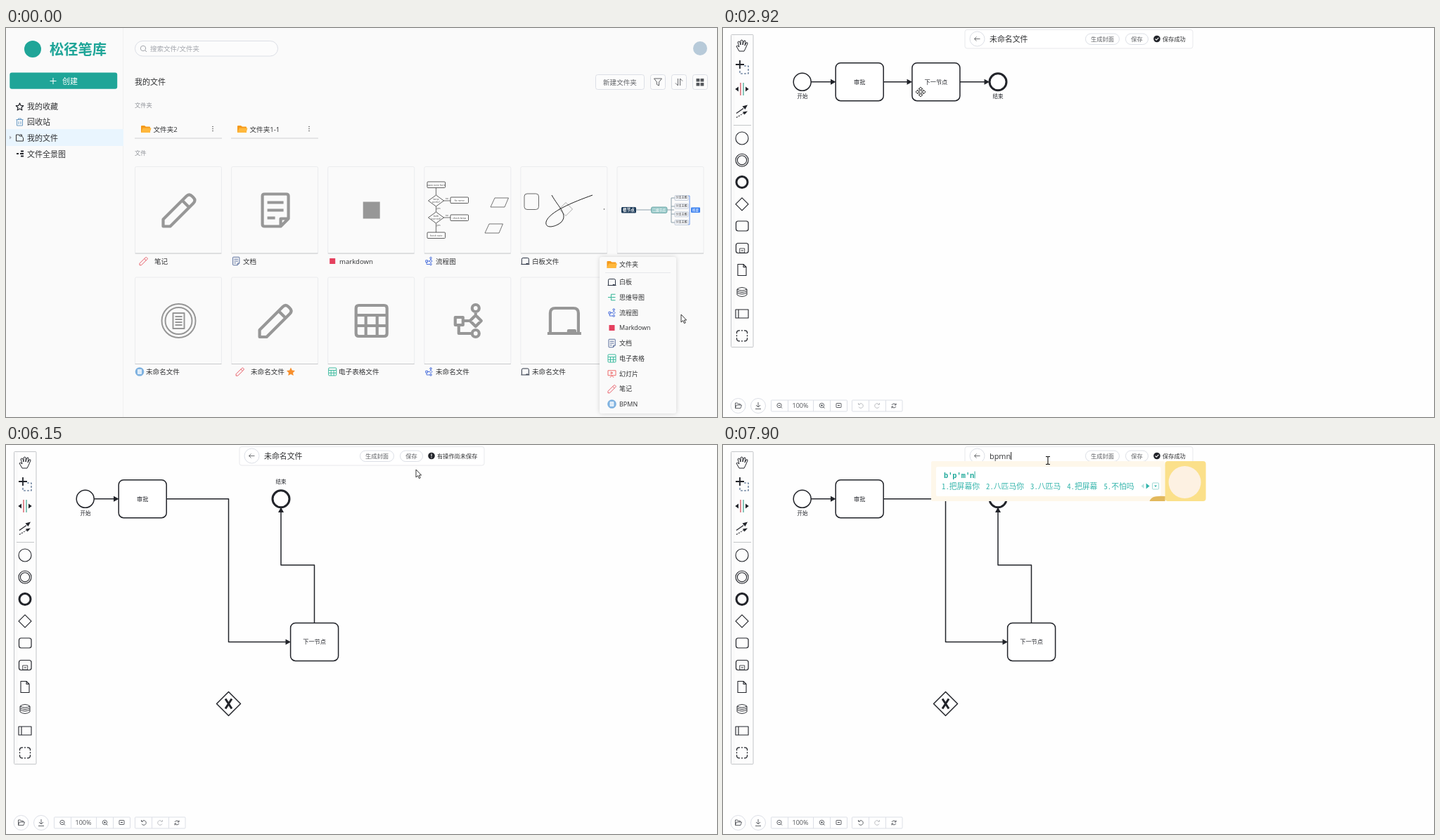
Write an HTML page with a canvas that moves like this. It is 1011 by 554 pixels and loops after 8000 ms.

```html
<!DOCTYPE html>
<html lang="zh">
<head>
<meta charset="utf-8">
<style>
html, body { margin: 0; width: 100%; height: 100%; overflow: hidden; background: #fff; }
canvas { display: block; }
</style>
</head>
<body>
<canvas id="stage" width="1011" height="554"></canvas>
<script>
const ctx = document.getElementById('stage').getContext('2d');
const LOOP = 8000, INK = '#22242a', TEAL = '#1fa598', BLUE = '#0a8ef5', GREY = '#979797', RULE = '#dcdfe6';
const SANS = '"Open Sans", "Noto Sans CJK SC", "Noto Sans CJK", sans-serif';
const MONO = '"Noto Sans Mono CJK SC", "Noto Sans CJK SC", monospace';

// ---------- drawing helpers ----------
function text(s, x, y, size, color = '#303133', { align = 'left', weight = 400, font = SANS } = {}) {
  ctx.font = `${weight} ${size}px ${font}`;
  ctx.textAlign = align;
  ctx.fillStyle = color;
  ctx.fillText(s, x, y + size * 0.37);
}
function paint(path, fill, stroke, width = 1) {
  if (fill) { ctx.fillStyle = fill; ctx.fill(path); }
  if (stroke) { ctx.strokeStyle = stroke; ctx.lineWidth = width; ctx.stroke(path); }
}
function box(x, y, w, h, r, fill, stroke, width) {
  const p = new Path2D();
  p.roundRect(x, y, w, h, r);
  paint(p, fill, stroke, width);
}
function disc(x, y, r, fill, stroke, width) {
  const p = new Path2D();
  p.arc(x, y, r, 0, 7);
  paint(p, fill, stroke, width);
}
function pen(d, x = 0, y = 0, color = INK, width = 1, { scale = 1, fill, dash = [] } = {}) {
  ctx.save();
  ctx.translate(x, y);
  ctx.scale(scale, scale);
  ctx.setLineDash(dash);
  ctx.lineJoin = 'round';
  paint(new Path2D(d), fill, color, width / scale);
  ctx.restore();
}
const diamond = r => `M0 ${-r}L${r} 0L0 ${r}L${-r} 0Z`;

// ---------- file icons on a 50 unit square ----------
const ICON = {
  pencil: 'M-22 23V13L11-20Q15-24 19-20L21-18Q25-14 21-10L-12 23ZM5-14L15-4',
  doc: 'M-15-23H16Q19-23 19-20V12L8 23H-15Q-18 23-18 20V-20Q-18-23-15-23ZM-11-11H12M-11 0H12M-11 11H0M19 12H8V23',
  table: 'M-18-22H18Q22-22 22-18V18Q22 22 18 22H-18Q-22 22-22 18V-18Q-22-22-18-22ZM-22-8H22M-22 7H22M-8-8V22M8-8V22',
  flow: 'M16-18a5 5 0 1 1-10 0a5 5 0 1 1 10 0M16 18a5 5 0 1 1-10 0a5 5 0 1 1 10 0M11-8L19 0L11 8L3 0ZM-18-5H-7V6H-18ZM-7 0H3M11-13V-8M-13 6V18H6',
  board: 'M-20 17V-11Q-20-18-13-18H13Q20-18 20-11V17M-24 18H24M6 18V14H15V18',
  list: 'M24 0a24 24 0 1 1-48 0a24 24 0 1 1 48 0M19 0a19 19 0 1 1-38 0a19 19 0 1 1 38 0M-8-11H8V11H-8ZM-5-6H5M-5-2H5M-5 2H5M-5 6H5',
  slides: 'M-22-18H22V10H-22ZM-10 22L0 10L10 22M-5-10L6-4L-5 2Z',
  mind: 'M-22 0H0M-4-17V17M-4-17H20M0 0H20M-4 17H20',
};
const TINT = { pencil: '#e8606a', doc: '#5a6f9c', table: '#3dbb9f', flow: '#4a6fdc', board: '#2c3444', slides: '#ee6b6b', mind: '#35b597' };
const bigIcon = (name, x, y) => pen(ICON[name], x, y, GREY, name === 'list' ? 2 : 4.2);
function smallIcon(name, x, y) {
  if (name === 'mark') box(x - 4, y - 4, 8, 8, 0, '#e5405e');
  else if (name === 'folder') folder(x, y);
  else if (name === 'list') {
    disc(x, y, 6.3, '#7fb2e0');
    box(x - 2.5, y - 3, 5, 6, 0, '#dcebf8', '#fff', 0.7);
  } else pen(ICON[name], x, y, TINT[name], 1, { scale: 0.25 });
}
function folder(x, y) {
  pen('M-7 5V-4Q-7-5-6-5H-2L0-3.5H5Q6-3.5 6-2.5V5Z', x, y, null, 0, { fill: '#f59a1b' });
  pen('M-7 5L-4.5-1.5H7.5L5.5 5Z', x, y, null, 0, { fill: '#ffb83d' });
}

// ---------- file list page ----------
function shell() {
  ctx.fillStyle = '#fafafa';
  ctx.fillRect(0, 0, 1011, 554);
  pen('M166.5 0V554', 0, 0, '#f0f0f1');
  disc(38, 30, 12, TEAL);
  text('松径笔库', 62, 30.5, 20.3, TEAL, { weight: 700 });
  box(5.3, 63.4, 152.9, 23.4, 3, TEAL);
  pen('M-4.5 0H4.5M0-4.5V4.5', 67, 75.5, '#fff');
  text('创建', 80, 75.5, 11, '#fff');
  box(0, 144, 167, 24, 0, '#e9f5fe');
  pen('M0-2.5L3 0L0 2.5Z', 5, 156, null, 0, { fill: '#a8abb2' });
  ['我的收藏', '回收站', '我的文件', '文件全景图'].forEach((s, i) => text(s, 30, [112, 134, 156.5, 179.5][i], 11));
  pen('M0-5L1.6-1.6L5.2-1.3L2.5 1.2L3.3 5L0 3L-3.3 5L-2.5 1.2L-5.2-1.3L-1.6-1.6Z', 19.5, 112, INK, 1.2);
  pen('M-5-3.5H5M-2-3.5V-5H2V-3.5M-4-3.5V5H4V-3.5M-1.5-1V3M1.5-1V3', 19.5, 134, '#6d9cc4');
  pen('M-5 4.5V-4.5H-1L0-2.5H3L5 0V4.5ZM0-4.5H3V-2.5', 19.5, 156.5, '#333');
  pen('M-5 0H-2M0 0H5M1-3.5H5M1 3.5H5', 20, 179, INK, 1.8);

  box(183.5, 18.5, 203, 21.5, 10.75, '#fcfcfc', RULE);
  disc(195, 29, 3.7, null, '#9a9da3', 0.9);
  pen('M198 32L200 34', 0, 0, '#9a9da3');
  text('搜索文件/文件夹', 205, 29.5, 9.5, '#a3a6ad');
  disc(987, 29, 10, '#b7cad9');
  text('我的文件', 183, 77, 11);
  box(838.5, 66.5, 69, 21, 3, '#fcfcfc', RULE);
  text('新建文件夹', 849, 77, 9.6, '#606266');
  [916.5, 946.5, 976.5].forEach(x => box(x, 66.5, 21, 21, 3, '#fcfcfc', RULE));
  pen('M-5.5-5H5.5L1.5 0V5L-1.5 3.5V0Z', 927, 77, '#606266');
  pen('M-1.5-5V5L-5 1.5M1.5 5V-5L5-1.5', 957, 77, '#606266');
  for (const x of [981.5, 987.5]) for (const y of [72, 78]) box(x, y, 4.8, 4.6, 0.5, '#55585d');
}

const FILES = [
  [['pencil', '笔记', 211], ['doc', '文档', 337], ['mark', 'markdown', 474], ['flow', '流程图', 611], ['board', '白板文件', 748], []],
  [['list', '未命名文件', 199], ['pencil', '未命名文件', 348], ['table', '电子表格文件', 473], ['flow', '未命名文件', 611], ['board', '未命名文件', 748]],
];
function fileList() {
  text('文件夹', 183, 109.5, 8.3, '#909399');
  text('文件', 183, 178, 8.3, '#909399');
  ['文件夹2', '文件夹1-1'].forEach((s, i) => {
    const x = 183 + 137 * i;
    pen('M0 0H124', x, 157, '#cfd0d2');
    folder(x + 16, 144);
    text(s, x + 26.5, 144, 9.6);
    for (const dy of [-3, 0, 3]) disc(x + 111, 143.5 + dy, 0.8, '#555');
  });
  FILES.forEach((row, r) => row.forEach(([icon, name, textX], c) => {
    const x = 183.5 + 137.1 * c, y = 197.5 + 157.5 * r, cx = x + 62, cy = y + 62;
    box(x, y, 123, 123.5, 2, '#fafafa', '#ebecee');
    pen('M0 0H123', x, y + 123.5, '#c9cacc');
    if (!icon) return;
    const wide = icon === 'pencil';
    smallIcon(icon, x + (wide ? 12 : 6.5), y + 134.5);
    text(name, textX, y + 134.5, 9.6);
    if (r === 0 && c > 2) return;
    if (icon === 'mark') box(cx - 12, cy - 12, 24, 24, 0, GREY);
    else bigIcon(icon, cx, cy);
  }));
  pen('M0-6L1.8-2L6-1.6L3 1.4L3.8 5.6L0 3.5L-3.8 5.6L-3 1.4L-6-1.6L-1.8-2Z', 405, 489.5, null, 0, { fill: '#f78f2d' });
  thumbnails();
}
function thumbnails() {
  const tiny = (s, x, y, color = '#444') => text(s, x, y, 3.6, color, { align: 'center' });
  pen('M611.5 227V238M611.5 254V262M611.5 278V291M622 246H632M622 270H633', 0, 0, '#333', 0.7);
  [[599, 219, 'open note form'], [632, 241, 'fix name'], [632, 266, 'check lamp'], [599, 291, 'finish note']].forEach(([x, y, s]) => {
    box(x, y, 25.5, 8.5, 1, '#fff', '#333', 0.8);
    tiny(s, x + 12.7, y + 4.2);
  });
  [[246, 'lamp', 'works?'], [270, 'bulb', 'burned?']].forEach(([y, a, b]) => {
    pen('M0-8L11 0L0 8L-11 0Z', 611.5, y, '#333', 0.8, { fill: '#fff' });
    tiny(a, 611.5, y - 2);
    tiny(b, 611.5, y + 2);
    tiny('no', 627, y - 3);
    tiny('yes', 615, y + 11);
  });
  for (const [x, y] of [[689, 242], [681, 279]]) pen('M6 0H25.5L20 13H0Z', x, y, '#555', 0.8);

  box(737, 236, 20.5, 22.5, 4, null, '#444', 0.8);
  pen(diamond(9.5), 796, 258, '#888', 0.7);
  pen('M834 238C806 248 772 262 768 276C766 287 782 283 789 277C800 266 786 256 776 238', 0, 0, '#222', 1);
  disc(850.5, 258, 0.7, '#333');

  pen('M896 259H950M946 242V277M946 242H951M946 254H951M946 265H951M946 277H951', 0, 0, '#7d93a0', 0.9);
  pen('M970 239H972V280H970', 0, 0, '#4a82e8', 0.8);
  box(875, 255, 21, 8.5, 1.5, '#1c3a58');
  text('根节点', 885.5, 259, 5.6, '#fff', { align: 'center', weight: 700 });
  box(917.5, 255, 22.5, 8.5, 2, '#9fcdcd', '#5d9e9e', 0.8);
  text('二级节点', 928.7, 259, 4.6, '#fff', { align: 'center' });
  for (const y of [242, 253.7, 265.3, 277]) {
    box(951, y - 3.5, 19, 7, 1, '#f4f6fa', '#a8b4c4', 0.6);
    text('分支主题', 960.5, y, 4, '#333', { align: 'center' });
  }
  box(974, 255.5, 13, 7.5, 1, '#3f83f0');
  text('概要', 980.5, 259.2, 4.4, '#fff', { align: 'center' });
}

const MENU = [['folder', '文件夹', 337], ['board', '白板', 362], ['mind', '思维导图', 383.5], ['flow', '流程图', 405.5], ['mark', 'Markdown', 427],
  ['doc', '文档', 449], ['table', '电子表格', 470.5], ['slides', '幻灯片', 492.3], ['pencil', '笔记', 514], ['list', 'BPMN', 535.5]];
function createMenu() {
  ctx.save();
  ctx.shadowColor = 'rgba(0,0,0,.16)';
  ctx.shadowBlur = 6;
  box(844, 326, 109, 223, 3, '#fafafa');
  ctx.restore();
  pen('M852 348.5H945', 0, 0, '#e6e7ea');
  for (const [icon, s, y] of MENU) {
    smallIcon(icon, 861.5, y);
    text(s, 872, y, 9);
  }
}
function loading() {
  ctx.fillStyle = '#f5f7f9';
  ctx.fillRect(183, 105, 810, 391);
  ctx.fillRect(838, 496, 121, 58);
}

// ---------- diagram editor ----------
function connectIcon(x, y, s = 1) {
  pen('M-8 3L2-4', x, y, INK, 1.2 * s, { scale: s });
  pen('M8-9L4.5-2.5L.5-7ZM8 0L3.5 5L1 1Z', x, y, null, 0, { scale: s, fill: INK });
  pen('M-8 9L2 3', x, y, INK, 1.1 * s, { scale: s, dash: [2, 1.5] });
}
function palette(hoverGateway) {
  box(11.5, 9.5, 31.5, 445, 1, '#fafafa', '#c4c6c9');
  box(17, 10, 25, 444, 0, '#fdfdfd');
  pen('M15 138.5H40', 0, 0, '#c4c6c9');
  pen('M-4 8L-8 1Q-7-1-4 2L-6-5Q-4-7-3-5L-2-1L-2-7Q0-9 1-7V-1L3-7Q5-8 5-5L4 0L6-4Q8-5 8-3L5 4L3 8Z', 27, 25);
  pen('M-9-4H3M-3-10V2', 27, 56, INK, 1.8);
  pen('M3-2H9V9H-3V3', 27, 56, '#3c5a80', 1.1, { dash: [3, 2] });
  pen('M-2-9V9', 27, 87, '#d0424f', 1.2);
  pen('M2-9V9', 27, 87, '#3aa38c', 1.2);
  pen('M-9 0H-5M5 0H9', 27, 87, INK, 1.6);
  pen('M-5-3.5V3.5L-9.5 0ZM5-3.5V3.5L9.5 0Z', 27, 87, null, 0, { fill: INK });
  connectIcon(27, 118.5);
  disc(27, 157, 9, null, INK, 1.1);
  disc(27, 188.3, 9, null, INK, 1.1);
  disc(27, 188.3, 6.6, null, INK, 1.1);
  disc(27, 219.5, 8, null, INK, 3);
  pen(diamond(9), 27, 250.8, hoverGateway ? BLUE : INK, 1.2);
  box(18.5, 275, 17.5, 14, 3, null, INK, 1.2);
  box(18.5, 306.5, 17.5, 14, 3, null, INK, 1.2);
  box(23.7, 314, 7, 6, 0, null, INK, 0.8);
  pen('M25.5 317H29', 0, 0, INK, 0.9);
  pen('M-6-8H2L6-4V8H-6ZM2-8V-4H6', 27, 344.5, INK, 1.1);
  pen('M-7-4V4Q0 9 7 4V-4Q0-9-7-4Q0 0 7-4M-7-1.5Q0 2.5 7-1.5M-7 1Q0 5 7 1', 27, 376, INK, 0.9);
  pen('M-9-6H9V6H-9ZM-5-6V6', 27, 407, INK, 1.1);
  pen('M-7.5-3V-4Q-7.5-7.5-4-7.5H-3M3-7.5H4Q7.5-7.5 7.5-4V-3M7.5 3V4Q7.5 7.5 4 7.5H3M-3 7.5H-4Q-7.5 7.5-7.5 4V3M-1-7.5H1M-1 7.5H1M-7.5-1V1M7.5-1V1', 27, 438.3, INK, 1.3);
}
function bottomBar(canUndo) {
  const c = '#4f5257', pale = '#b4b6ba';
  for (const x of [21.5, 50]) disc(x, 538, 10.5, '#fff', RULE);
  pen('M-4 3.5V-4H-1L0-2.5H3V-1M-4 3.5L-2.5-1H5L3.5 3.5Z', 21.5, 538, c, 0.9);
  pen('M0-5V2M-3-1L0 2L3-1M-4 4.5H4', 50, 538, c, 0.9);
  box(68.5, 530, 108, 16, 1, '#fff', RULE);
  box(183.5, 530, 71.5, 16, 1, '#fff', RULE);
  pen('M92.5 530V546M128.5 530V546M152.5 530V546M207.5 530V546M231.5 530V546', 0, 0, RULE);
  for (const x of [80, 140.5]) {
    disc(x, 537.5, 3.2, null, c, 0.9);
    pen('M2.3 2.3L4 4M-1.5 0H1.5' + (x > 100 ? 'M0-1.5V1.5' : ''), x, 537.5, c, 0.9);
  }
  text('100%', 110, 538, 9, '#505357', { align: 'center' });
  box(161, 534.5, 7, 6, 0.5, null, c, 0.9);
  pen('M163 537.5H166', 0, 0, c, 1.2);
  pen('M-2.5-2.2A3.3 3.3 0 1 1-3 1.5M-3.5-4V-1.7H-1', 196, 538, canUndo ? c : pale, 0.9);
  pen('M2.5-2.2A3.3 3.3 0 1 0 3 1.5M3.5-4V-1.7H1', 219, 538, pale, 0.9);
  pen('M-3-1A3.3 3.3 0 0 1 3-1M3 1A3.3 3.3 0 0 1-3 1M3-3.5V-1H.8M-3 3.5V1H-.8', 243, 538, c, 0.9);
}
function header(unsaved, typed, selected) {
  const x = unsaved ? 332 : 344;
  box(x, 2.5, unsaved ? 348 : 324, 26.5, 3, '#fff', '#e8e9ec');
  disc(x + 17.5, 15.5, 10.5, '#fff', RULE);
  pen('M4 0H-4M-1-3L-4 0L-1 3', x + 17.5, 15.5, '#606266', 0.9);
  if (selected) box(x + 35, 8, 55, 16, 0, '#a9cdf5');
  text(typed || '未命名文件', x + 35, 15.8, 10.9);
  if (typed) {
    const w = ctx.measureText(typed).width;
    pen('M0-5V6', x + 35.5 + w, 15, '#222');
  }
  [[171, 49, '生成封面'], [228, 33, '保存']].forEach(([dx, w, s]) => {
    box(x + dx + 0.5, 8, w - 1, 15.5, 7.75, '#fff', RULE);
    text(s, x + dx + w / 2, 15.7, 8.3, '#606266', { align: 'center' });
  });
  disc(x + 273, 15.5, 4.8, INK);
  pen(unsaved ? 'M0-3V.8M0 1.8V3' : 'M-2.3 0L-.7 1.7L2.4-1.6', x + 273, 15.5, '#fff', 1.1);
  text(unsaved ? '有操作尚未保存' : '保存成功', x + 281, 15.8, 8.2);
}

const arrowHead = (x, y, turn = 0) => {
  ctx.save();
  ctx.translate(x, y);
  ctx.rotate(turn);
  pen('M0 0L-7.5-4V4Z', 0, 0, null, 0, { fill: INK });
  ctx.restore();
};
const label = (s, x, y, size = 8.2) => text(s, x, y, size, INK, { align: 'center' });
function task(x, y, name, color = INK) {
  box(x - 34, y - 27, 68, 54, 7, '#fff', color, 1.5);
  label(name, x, y);
}
function gateway(x, y, color = INK) {
  pen(diamond(17), x, y, color, 1.5, { fill: '#fff' });
  pen('M-4.5-7L4.5 7M4.5-7L-4.5 7', x, y, color, 3);
}
function selection(x, y, w, h) {
  box(x, y, w, h, 2, null, BLUE, 1.5);
  const px = x + w + 11.5, py = y + 7.5;
  disc(px, py, 5.6, null, INK, 2);
  pen(diamond(6.5), px + 16.3, py, INK, 0.9);
  box(px + 26.5, py - 5.5, 12.5, 10.5, 2.5, null, INK, 0.9);
  disc(px, py + 16, 6, null, INK, 0.9);
  disc(px, py + 16, 4.4, null, INK, 0.9);
  pen('M6-6H2V6H6', px + 16.3, py + 16, INK, 0.9);
  pen('M-6 6L2 0', px + 16.3, py + 16, INK, 1, { dash: [1.5, 1.5] });
  pen('M-6 4L2-1M2-1Q1-5 5-4M2-1Q6 1 6-3', px, py + 32.5, INK, 2);
  pen('M-5-4H5M-2-4V-6H2V-4M-3.7-4V5H3.7V-4M-1.2-2V3M1.2-2V3', px + 16.3, py + 32.5, INK, 0.9);
  connectIcon(px, py + 48, 0.65);
}
function diagram(t, pointer) {
  const moved = t >= 3410, dragging = t >= 2960 && !moved;
  const flow = d => pen(d, 0, 0, INK, 1.5);
  disc(112.7, 76.8, 12.5, '#fff', INK, 1.5);
  label('开始', 113, 97.5, 7.5);
  flow('M125 76.7H154');
  arrowHead(160.5, 76.7);
  task(194.2, 76.7, '审批');
  if (moved) {
    flow('M228 76.7H316.5V280.4H398M438.5 253V171H391V95');
    arrowHead(405, 280.4);
    arrowHead(391, 88.5, -Math.PI / 2);
  } else {
    flow('M228 76.7H263M337 76.7H373');
    arrowHead(269, 76.7);
    arrowHead(379, 76.7);
  }
  disc(391, 76.8, 12, '#fff', INK, 3);
  label('结束', 391, moved ? 52 : 97.5, 7.5);
  ctx.globalAlpha = dragging ? 0.3 : 1;
  task(moved ? 438.6 : 302.9, moved ? 280.4 : 76.7, '下一节点');
  ctx.globalAlpha = 1;

  const snapLine = x => pen('M0 0V554', x, 0, '#7cc4fb');
  if (dragging) {
    const x = pointer.x + 22, y = pointer.y - 14;
    if (Math.abs(x - 391) < 12) snapLine(391);
    task(x, y, '下一节点', BLUE);
  }
  if (moved && t < 4560) selection(400.5, 249.5, 76, 62);
  if (t >= 5250) gateway(316.5, 368.5);
  else if (t >= 4560) {
    if (Math.abs(pointer.x - 316) < 5) snapLine(316.5);
    gateway(pointer.x, pointer.y, BLUE);
  }
  if (t >= 5250 && t < 5820) selection(295.5, 347.5, 42, 42);
}

// ---------- input method panel ----------
const CANDIDATES = {
  b: ['不', '吧', '把', '被', '比'],
  bp: ['不怕', '八匹', '白胖', '奔跑', '爆破'],
  bpm: ['不怕吗', '八匹马', '把屏幕', '白屏吗', '不跑吗'],
  bpmn: ['把屏幕你', '八匹马你', '八匹马', '把屏幕', '不怕吗'],
};
function inputPanel(typed) {
  const em = 10.8, words = CANDIDATES[typed];
  const end = 311 + words.reduce((sum, w) => sum + (w.length + 1) * em + 9, -9);
  const right = Math.max(610, end + 102);
  box(296, 23, right - 354, 57, 2, '#fef7ea');
  box(303, 31, right - 367, 42, 2, '#fff');
  box(right - 58, 23, 58, 57, 4, '#fbe08a');
  pen('M-80 57Q-78 48-58 50V57Z', right, 23, null, 0, { fill: '#e2b85c' });
  disc(right - 30, 53, 23, '#fdf1e2');
  const spelled = [...typed].join("'");
  text(spelled, 314, 43, 10.3, '#17a596', { weight: 700, font: '"Liberation Mono", monospace' });
  pen('M0-5V5', 315 + spelled.length * 6.15, 42.5, '#17a596', 0.9);
  const style = { font: MONO, weight: 300 };
  let x = 311;
  words.forEach((w, i) => {
    text(`${i + 1}.`, x, 58.7, em, '#35b5ac', style);
    text(w, x + em, 58.7, em, '#35b5ac', style);
    x += (w.length + 1) * em + 9;
  });
  pen('M3-3.5V3.5L-1 0Z', right - 91, 58.5, null, 0, { fill: '#b4e2de' });
  pen('M-2-4V4L3 0Z', right - 83, 58.5, null, 0, { fill: '#35b5ac' });
  box(right - 76, 54, 9, 9, 1, '#fff', '#9fd9d4');
  pen('M-2-1H2L0 1.5Z', right - 71.5, 58.5, null, 0, { fill: '#35b5ac' });
}

// ---------- pointer ----------
const PATH = [[310, 960, 408], [1090, 858, 517], [1120, 858, 517], [1370, 897, 535], [1800, 897, 535], [2480, 452, 556],
  [2880, 281, 91], [2950, 281, 91], [3280, 401, 270], [3380, 416, 294], [3430, 416, 294], [3570, 243, 256], [3750, 243, 256],
  [4090, 54, 234], [4380, 25, 247], [4530, 25, 247], [5100, 316, 368], [5480, 316, 368], [5750, 197, 300], [5840, 197, 300],
  [6150, 583, 35], [6260, 580, 40], [6310, 580, 40], [6620, 425, 18], [6700, 425, 18], [6930, 462, 22]];
function pointerAt(t) {
  const i = PATH.findIndex(p => p[0] > t);
  if (i === 0) return { x: PATH[0][1], y: PATH[0][2] };
  if (i < 0) return { x: 462, y: 22 };
  const [t0, x0, y0] = PATH[i - 1], [t1, x1, y1] = PATH[i];
  const k = (t - t0) / (t1 - t0), e = k * k * (3 - 2 * k);
  return { x: x0 + (x1 - x0) * e, y: y0 + (y1 - y0) * e };
}
function drawPointer(t, { x, y }) {
  if (t >= 1800 && t < 2480) return;
  const onTask = t >= 2840 && t < 3440;
  if (onTask) {
    const d = 'M0-7L3-4H1V-1H4V-3L7 0L4 3V1H1V4H3L0 7L-3 4H-1V1H-4V3L-7 0L-4-3V-1H-1V-4H-3Z';
    pen(d, x, y, '#222', 0.9, { fill: '#fff' });
  } else if (t >= 6540) {
    pen('M-3-5.5H-1L0-5L1-5.5H3M0-5V5M-3 5.5H-1L0 5L1 5.5H3', x, y, '#111', 1.1);
  } else {
    pen('M0 0V11L2.6 8.6L4.4 12.6L6.2 11.8L4.4 8H7.6Z', x, y, '#222', 0.9, { fill: '#fff' });
  }
}

// ---------- timeline ----------
function typedAt(t) {
  return t < 7300 ? '' : t < 7700 ? 'b' : t < 7770 ? 'bp' : t < 7850 ? 'bpm' : 'bpmn';
}
function render(t) {
  const pointer = pointerAt(t), typed = typedAt(t);
  if (t < 1750) {
    shell();
    if (t < 1520) { fileList(); createMenu(); }
    else loading();
  } else {
    ctx.fillStyle = '#fefefe';
    ctx.fillRect(0, 0, 1011, 554);
    if (t >= 1800) {
      palette(t > 4090 && t < 4700 && pointer.x < 40);
      bottomBar(t >= 3450);
      header(t >= 3450 && t < 7800, typed, t >= 6800 && t < 7300);
    }
    if (t >= 1860) diagram(t, pointer);
    if (t >= 7360) inputPanel(typed);
  }
  drawPointer(t, pointer);
}
const start = performance.now();
(function tick() {
  render((performance.now() - start) % LOOP);
  requestAnimationFrame(tick);
})();
</script>
</body>
</html>
```
